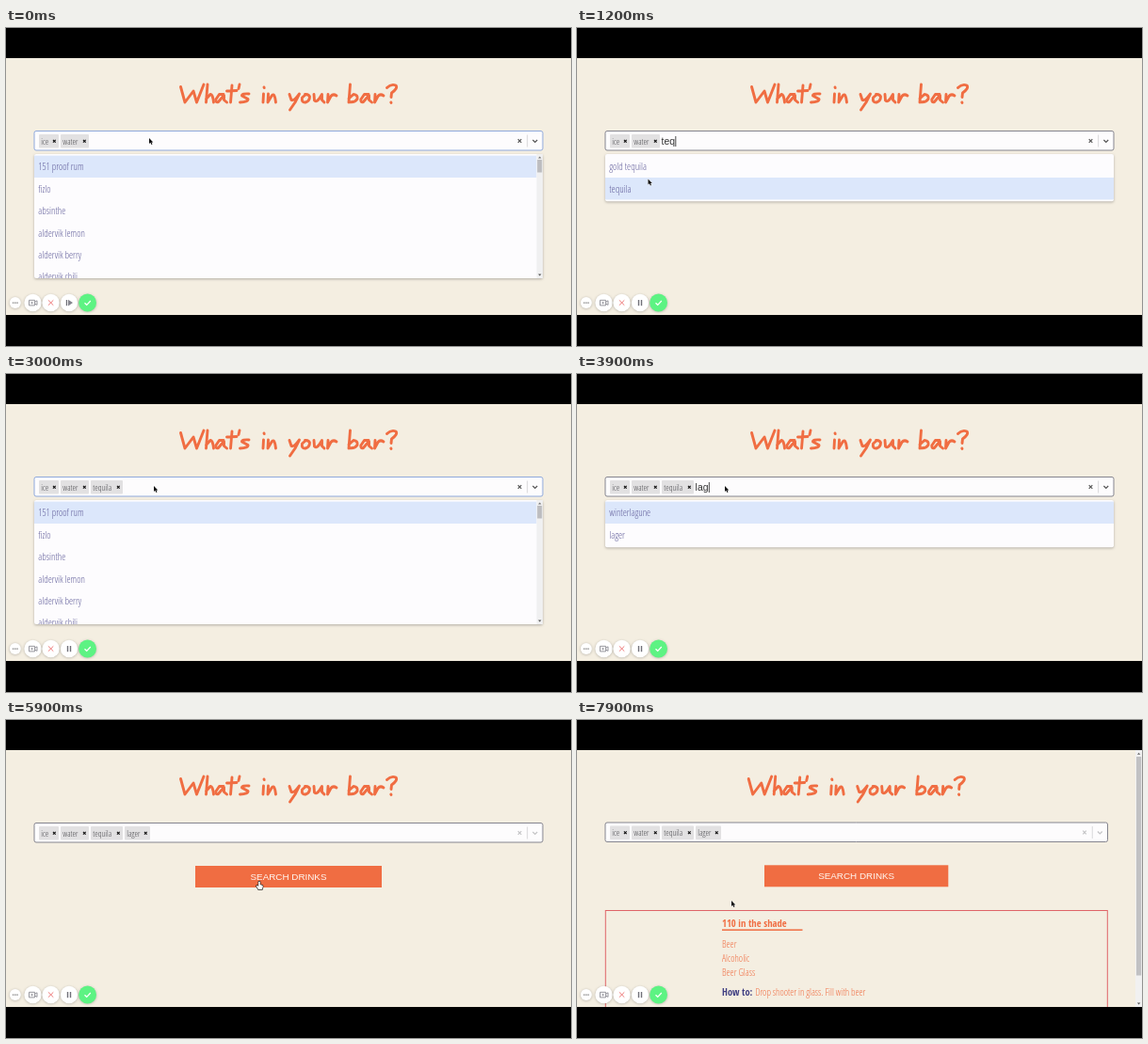
Animation of 600 by 338 pixels, one loop 8 s. Source, as an HTML page with a canvas:

```html
<!DOCTYPE html>
<html lang="en">
<head>
<meta charset="utf-8">
<title>What's in your bar?</title>
<style>
html, body { margin: 0; width: 100%; height: 100%; overflow: hidden; background: #000; }
canvas { display: block; width: 600px; height: 338px; }
</style>
</head>
<body>
<canvas id="stage" role="img" aria-label="What's in your bar? A drink search form"></canvas>
<script>
const LOOP = 8000;
const canvas = document.getElementById('stage');
const ctx = canvas.getContext('2d');
const ratio = window.devicePixelRatio || 1;
canvas.width = 600 * ratio;
canvas.height = 338 * ratio;

const ORANGE = '#f06d42', INK = '#625f9b', SANS = '"Liberation Sans", Arial, sans-serif';
const LIGHT = '"Open Sans Condensed Light", "Open Sans", sans-serif';
const BOLD = '"Open Sans Condensed", "Open Sans", sans-serif';

const pantry = ['151 proof rum', 'fizlo', 'absinthe', 'aldervik lemon', 'aldervik berry',
  'aldervik chili', 'amaretto', 'bitters', 'butter', 'chocolate', 'winterlagune',
  'gold tequila', 'lager', 'tequila', 'white wine'];

// Each step changes part of the form from its time on.
const steps = [
  { at: 0, chips: 2, typed: '', open: true, hover: 0, border: '#8fa9dc', icons: '#555', pressed: false, paused: false },
  { at: 100, paused: true },
  { at: 400, typed: 't' },
  { at: 600, typed: 'te' },
  { at: 800, typed: 'teq', border: '#85858f' },
  { at: 1100, hover: 1 },
  { at: 1300, pressed: true },
  { at: 1400, chips: 3, typed: '', open: false, pressed: false, hover: 0 },
  { at: 1800, border: '#cccbc8', icons: '#c4c4c6' },
  { at: 2700, open: true, border: '#8fa9dc', icons: '#555' },
  { at: 3700, typed: 'lag', border: '#85858f' },
  { at: 4200, hover: 1 },
  { at: 4400, pressed: true },
  { at: 4500, chips: 4, typed: '', open: false, pressed: false, hover: 0 },
  { at: 4800, icons: '#c4c4c6' },
  { at: 5000, hot: true, hand: true },
  { at: 7200, results: true },
  { at: 7400, hand: false }
];

// Pointer stops: time, x, y
const stops = [[0, 152, 117], [800, 152, 117], [1200, 75.5, 160.5], [1500, 75.5, 161], [2200, 157, 119],
  [3900, 157, 119], [4300, 65.5, 168], [4700, 65.5, 168], [5100, 268, 174], [5900, 269, 175],
  [7200, 269, 175], [7800, 164, 192]];

// Pen strokes of the hand-lettered heading
const heading = [
  'M185.5 62.5L190 79L199 67L202.5 79L210 60',
  'M214 60L212.5 79M212.5 75.5L217 70.5Q219.5 70 220.5 79',
  'M231 70.5L226.5 70.5L222.8 76Q222.5 79.5 225.5 78.5L231.5 71.5L231.5 76.5L234.5 79',
  'M240 61L238.5 79M234.5 67L245 66.5',
  'M248 60L247 64.5',
  'M258 70Q250.5 69.5 250.5 72L257 75.5Q257.5 78.5 248.5 79',
  'M273.5 70L273 79M274 63L274.2 63.6',
  'M278.5 70L278 79L282.5 71.5Q285.5 69 286.5 79',
  'M301 70.5L303 76.5Q305.5 78 311 70.5M311.5 70L307 79L301.5 87',
  'M318.5 70.5L314.5 74Q313.5 79.5 318 79Q322.5 77.5 322.5 73Q321.5 70 317.5 70.5',
  'M327 70.5L327.5 77Q330 80.5 335.5 70.5L335.5 76.5L338 79',
  'M342 70.5L341.5 79L345 72.5Q347.5 69.5 351 72',
  'M365.5 60L364 79M364 75L369 70.5Q374 71 373 75.5Q370.5 79.5 364 78.5',
  'M385 70.5L380.5 70.5L376.8 76Q376.5 79.5 379.5 78.5L385.5 71.5L385.5 76.5L388.5 79',
  'M392 70.5L391.5 79L395 72.5Q397.5 69.5 401 72',
  'M404.5 63.5Q409 59 414 61Q416.5 64 409.5 69L409 73.5M408.8 79L409 79.4'
].map(d => new Path2D(d));

const arrow = new Path2D('M0 0L0 6L1.4 4.8L2.4 7L3.5 6.5L2.5 4.5L4.3 4.4Z');
const hand = new Path2D('M-.8 -3Q.2 -4 .8 -3V0L3.2 .7Q4 1 3.7 2.5L3 5H-1L-3.2 1.5Q-2.8 .3 -.8 1.7Z');

const ease = k => k * k * (3 - 2 * k);

function rect(x, y, w, h, color) {
  ctx.fillStyle = color;
  ctx.fillRect(x, y, w, h);
}

function panel(x, y, w, h, r, fill, line) {
  ctx.beginPath();
  ctx.roundRect(x, y, w, h, r);
  ctx.fillStyle = fill;
  ctx.fill();
  if (line) { ctx.strokeStyle = line; ctx.lineWidth = 1; ctx.stroke(); }
}

function stroke(d, color, width = 1) {
  ctx.strokeStyle = color;
  ctx.lineWidth = width;
  ctx.stroke(typeof d === 'string' ? new Path2D(d) : d);
}

function cross(x, y, r, color, width) {
  stroke(`M${x - r} ${y - r}L${x + r} ${y + r}M${x + r} ${y - r}L${x - r} ${y + r}`, color, width);
}

function shadow(color, blur, y) {
  ctx.shadowColor = color;
  ctx.shadowBlur = blur * ratio;
  ctx.shadowOffsetY = y * ratio;
}

function plain(str, x, y, size, color, align = 'left') {
  ctx.font = `${size}px ${SANS}`;
  ctx.textAlign = align;
  ctx.fillStyle = color;
  ctx.fillText(str, x, y);
}

// Narrow the regular face only when no condensed cut is installed.
ctx.font = '300 20px "Open Sans", sans-serif';
const normal = ctx.measureText('water and lager').width;
ctx.font = `300 condensed 20px ${LIGHT}`;
const squeeze = ctx.measureText('water and lager').width > normal * 0.9 ? 0.74 : 1;

function slim(str, x, y, size, color) {
  ctx.save();
  ctx.translate(x, y);
  ctx.scale(squeeze, 1);
  ctx.font = `300 condensed ${size}px ${LIGHT}`;
  ctx.textAlign = 'left';
  ctx.fillStyle = color;
  ctx.fillText(str, 0, 0);
  ctx.restore();
}

function bold(str, x, y, size, color) {
  ctx.font = `700 condensed ${size}px ${BOLD}`;
  ctx.textAlign = 'left';
  ctx.fillStyle = color;
  ctx.fillText(str, x, y);
}

function triangle(x, y, dir, color) {
  ctx.fillStyle = color;
  ctx.fill(new Path2D(`M${x - 1.7} ${y + dir}H${x + 1.7}L${x} ${y - dir}Z`));
}

function drawControl(s, t) {
  const right = s.results ? 563.5 : 570;
  const shift = right - 570;
  const y = s.results ? 119.5 : 120;
  panel(30, y - 10.5, right - 30, 20.5, 2, '#fdfcfd', s.border);
  const chips = [['ice', 35, 21], ['water', 58, 30], ['tequila', 90, 34], ['lager', 126, 27]].slice(0, s.chips);
  for (const [name, x, w] of chips) {
    panel(x, y - 7, w, 14.5, 1, '#e2e1e2');
    slim(name, x + 2.3, y + 3.7, 8.9, '#4c4c50');
    cross(x + w - 4.7, y + 0.3, 1.4, '#111', 1.1);
  }
  const [, x, w] = chips[chips.length - 1];
  if (s.typed) {
    plain(s.typed, x + w + 1.6, y + 3.8, 10.4, '#333');
    if ((t - s.typedAt) % 1000 < 500) rect(x + w + 2 + ctx.measureText(s.typed).width, y - 5, 0.8, 11, '#222');
  }
  cross(545.5 + shift, y, 1.8, s.icons, 1.2);
  rect(553.3 + shift, y - 6.5, 0.8, 13, '#d0d0d2');
  const cx = 561.8 + shift;
  stroke(`M${cx - 2.4} ${y - 1}L${cx} ${y + 1.4}L${cx + 2.4} ${y - 1}`, s.icons, 1.2);
}

function drawMenu(s) {
  const rows = pantry.filter(name => name.includes(s.typed));
  const long = rows.length > 5;
  const h = long ? 132 : rows.length * 23.4 + 3.4;
  const right = long ? 563.5 : 570;
  ctx.save();
  shadow('rgba(0,0,0,.28)', 3, 1);
  panel(30, 134, 540, h, 2, '#fdfcfe');
  ctx.restore();
  ctx.save();
  ctx.beginPath();
  ctx.rect(30, 134, 540, h);
  ctx.clip();
  rows.slice(0, 6).forEach((name, i) => {
    const y = 135.6 + i * 23.4;
    if (i === s.hover) rect(30, y, right - 30, 23.4, s.pressed ? '#b2d2f9' : '#dce7fb');
    slim(name, 34.3, y + 15.8, 10.4, INK);
  });
  if (long) {
    rect(563.5, 134, 6.5, h, '#f0f0f1');
    rect(564.2, 140, 5, 13.5, '#bdbdc0');
    triangle(566.8, 137.5, 1, '#777');
    triangle(566.8, 262.5, -1, '#555');
  }
  ctx.restore();
}

function drawButton(s) {
  const [x, y, w] = s.results ? [199, 154.3, 195.3] : [201, 155, 198];
  rect(x, y, w, 23, s.hot ? ORANGE : '#ec3c52');
  plain('SEARCH DRINKS', x + w / 2, y + 14.7, 9.85, '#fff8f2', 'center');
}

function drawResults() {
  ctx.strokeStyle = '#df6468';
  ctx.lineWidth = 1;
  ctx.strokeRect(30.3, 202.5, 533, 140);
  bold('110 in the shade', 154, 219.5, 10.6, ORANGE);
  rect(154, 222.4, 85.5, 1.5, ORANGE);
  ['Beer', 'Alcoholic', 'Beer Glass'].forEach((line, i) => slim(line, 154, 242.4 + i * 14.7, 10.3, ORANGE));
  bold('How to:', 154, 293, 10.4, '#403f82');
  slim('Drop shooter in glass. Fill with beer', 189.5, 293, 10.3, ORANGE);
  rect(593, 32, 7, 273, '#f1f1f1');
  rect(594, 39, 5.2, 232.5, '#c1c1c3');
  triangle(596.6, 35.7, 1, '#666');
  triangle(596.6, 301.5, -1, '#555');
}

function disc(x, r, fill) {
  ctx.save();
  shadow('rgba(0,0,0,.25)', 3, 0.6);
  ctx.beginPath();
  ctx.arc(x, 292, r, 0, 7);
  ctx.fillStyle = fill;
  ctx.fill();
  ctx.restore();
}

function drawTools(s) {
  disc(9.8, 6, '#fff');
  [28.5, 47.6, 67].forEach(x => disc(x, 9.2, '#fff'));
  disc(86.6, 9.4, '#5df383');
  for (const x of [7.6, 9.8, 12]) rect(x - 0.7, 291.5, 1.4, 1.2, '#777');
  stroke('M24.5 289.3H30.6V294.9H24.5ZM30.6 291.3L33 289.8V294.4L30.6 293', '#8b8b92', 0.9);
  stroke('M26.2 292.1H28.9M27.55 290.8V293.4', '#8b8b92', 0.7);
  cross(47.6, 292, 2.7, '#ee7777', 1);
  if (s.paused) {
    rect(64.8, 289, 1.4, 6.2, '#707078');
    rect(67.8, 289, 1.4, 6.2, '#707078');
  } else {
    rect(63.8, 289, 1.3, 6.2, '#707078');
    ctx.fillStyle = '#85858e';
    ctx.fill(new Path2D('M66 288.8L71 292.1L66 295.4Z'));
  }
  stroke('M83.5 292.2L85.7 294.3L89.8 290', '#fff', 1.2);
}

function drawPointer(s, t) {
  const next = stops.findIndex(p => p[0] > t);
  const b = next < 0 ? stops[stops.length - 1] : stops[next];
  const a = next < 0 ? b : stops[next - 1];
  const k = a === b ? 0 : ease((t - a[0]) / (b[0] - a[0]));
  ctx.save();
  ctx.translate(a[1] + (b[1] - a[1]) * k, a[2] + (b[2] - a[2]) * k);
  const shape = s.hand ? hand : arrow;
  stroke(shape, s.hand ? '#222' : '#fff', s.hand ? 1.3 : 0.8);
  ctx.fillStyle = s.hand ? '#fff' : '#111';
  ctx.fill(shape);
  ctx.restore();
}

function draw(t) {
  const s = {};
  for (const step of steps) {
    if (step.at > t) break;
    Object.assign(s, step);
    if (step.typed) s.typedAt = step.at;
  }
  ctx.setTransform(ratio, 0, 0, ratio, 0, 0);
  rect(0, 0, 600, 338, '#000');
  ctx.save();
  ctx.beginPath();
  ctx.rect(0, 32, 600, 273);
  ctx.clip();
  rect(0, 32, 600, 273, '#f4eee1');
  ctx.save();
  ctx.lineCap = ctx.lineJoin = 'round';
  if (s.results) ctx.translate(-3.3, 0);
  heading.forEach(letter => stroke(letter, ORANGE, 2.9));
  ctx.restore();
  drawControl(s, t);
  if (s.open) drawMenu(s);
  else drawButton(s);
  if (s.results) drawResults();
  drawTools(s);
  drawPointer(s, t);
  ctx.restore();
}

const start = performance.now();
function tick() {
  draw((performance.now() - start) % LOOP);
  requestAnimationFrame(tick);
}
tick();
</script>
</body>
</html>
```
